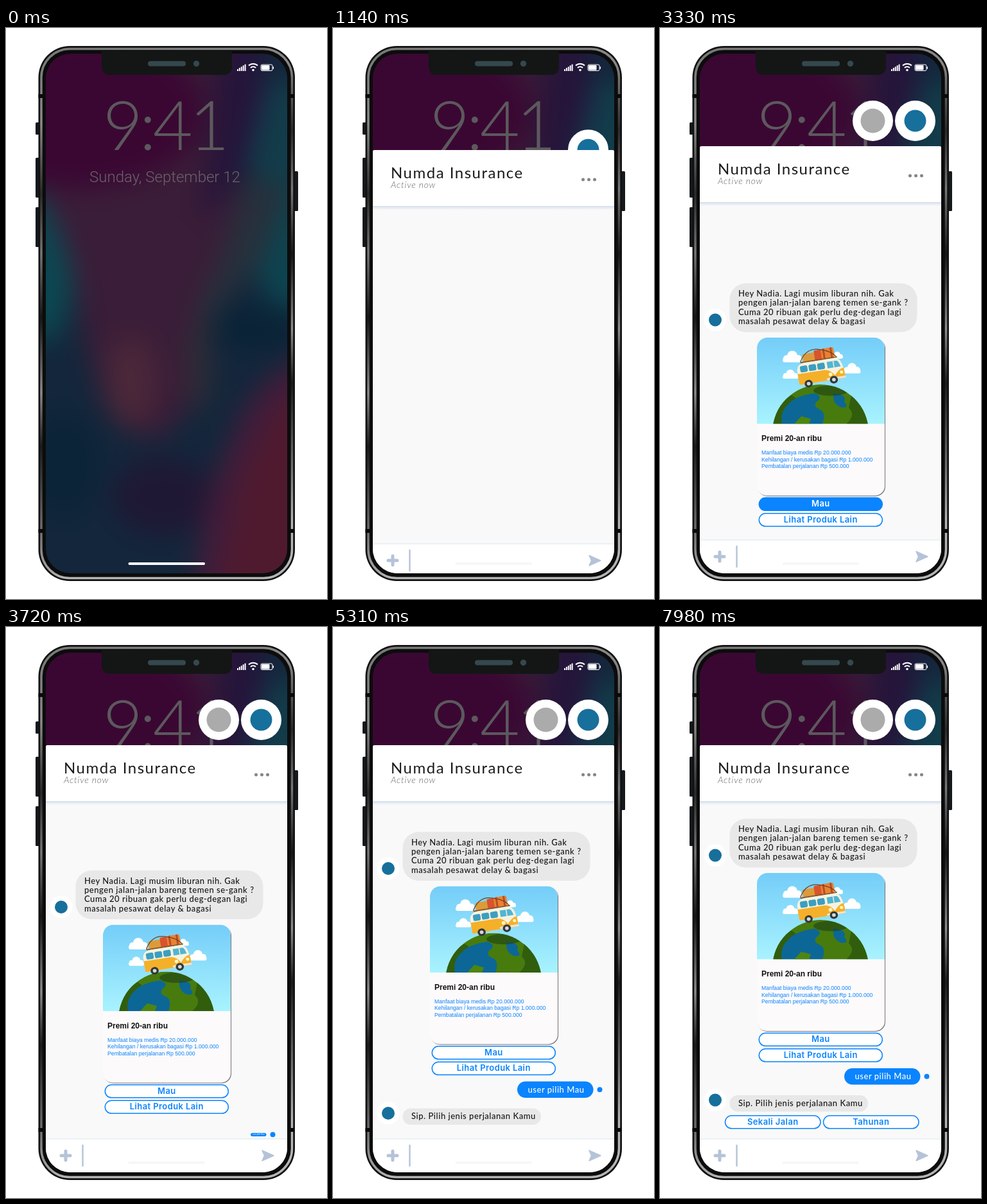
These frames come from a looping animation (500x889 px, 8000 ms). An HTML page:

```html
<!DOCTYPE html>
<html lang="id">
<head>
<meta charset="utf-8">
<title>Chat on a phone</title>
<style>
  html, body { margin: 0; width: 100%; height: 100%; overflow: hidden; background: #fff; }
  svg { display: block; width: 100vw; height: 100vh; }
  text { white-space: pre; }
  .chat { font: 500 13px Lato, sans-serif; letter-spacing: .53px; fill: #151515; }
  .label { font: 600 13px Inter, sans-serif; letter-spacing: .4px; text-anchor: middle; fill: #0a84ff; }
  .btn rect { fill: #fff; stroke: #0a84ff; stroke-width: 1.5; }
  .btn.on rect { fill: #0a84ff; }
  .btn.on text { fill: #fff; }
</style>
</head>
<body>
<svg id="stage" viewBox="0 0 500 889" xmlns="http://www.w3.org/2000/svg">
  <defs>
    <clipPath id="screen"><rect x="62" y="40" width="376" height="809" rx="38"/></clipPath>
    <clipPath id="picture"><path d="M151 219V101a16.500 16.500 0 0 1 16.500-16.500H333.500a16.500 16.500 0 0 1 16.500 16.500V219Z"/></clipPath>
    <clipPath id="ball"><circle cx="250" cy="232.500" r="75"/></clipPath>
    <filter id="soft" x="-30%" y="-30%" width="160%" height="160%" color-interpolation-filters="sRGB"><feGaussianBlur stdDeviation="20"/></filter>
    <linearGradient id="metal" x1="0" y1="0" x2=".12" y2="1">
      <stop offset="0" stop-color="#777"/><stop offset=".14" stop-color="#8a8a8a"/>
      <stop offset=".27" stop-color="#2a2a2a"/><stop offset=".38" stop-color="#777"/>
      <stop offset=".5" stop-color="#161616"/><stop offset=".64" stop-color="#8c8c8c"/>
      <stop offset=".74" stop-color="#1b1b1b"/><stop offset=".9" stop-color="#707070"/>
      <stop offset="1" stop-color="#b5b5b5"/>
    </linearGradient>
    <linearGradient id="sky" x1="0" y1="0" x2="0" y2="1">
      <stop offset="0" stop-color="#74cdf8"/><stop offset="1" stop-color="#a9f3ff"/>
    </linearGradient>
    <linearGradient id="fall" x1="0" y1="0" x2="0" y2="1">
      <stop offset="0" stop-color="#d3deec"/><stop offset="1" stop-color="#f9f9f9"/>
    </linearGradient>
  </defs>

  <g id="body"></g>

  <g clip-path="url(#screen)">
    <g id="wall" filter="url(#soft)"></g>
    <text x="247" y="190" text-anchor="middle" font-family="Lato, sans-serif" font-weight="300" font-size="107" letter-spacing="-5" fill="#5c595d">9:41</text>
    <text x="247.500" y="239.500" text-anchor="middle" font-family="Roboto, sans-serif" font-weight="300" font-size="24" fill="#6b636c">Sunday, September 12</text>
    <g id="status" fill="#fff"></g>

    <g id="second"><circle r="31.500" fill="#fff"/><circle r="19" fill="#ababab"/></g>
    <g id="first"><circle r="31.500" fill="#fff"/><circle r="17" fill="#176f9c"/></g>
    <rect x="190.500" y="832" width="119.500" height="4" rx="2" fill="#fff"/>

    <g id="panel">
      <path d="M62 700V3q0-3 3-3H435q3 0 3 3V700Z" fill="#f9f9f9"/>
      <path d="M62 87V3q0-3 3-3H435q3 0 3 3V87Z" fill="#fff"/>
      <rect x="62" y="87" width="376" height="6" fill="url(#fall)"/>
      <text x="90" y="44" font-family="Lato, sans-serif" font-size="24" letter-spacing="1.500" fill="#1b1b1b">Numda Insurance</text>
      <text x="90" y="59" font-family="Lato, sans-serif" font-size="14" font-weight="300" font-style="italic" letter-spacing=".7" fill="#666">Active now</text>
      <g fill="#858585"><circle cx="389.500" cy="46" r="2.500"/><circle cx="398.500" cy="46" r="2.500"/><circle cx="407.500" cy="46" r="2.500"/></g>
      <rect x="62" y="613" width="376" height="90" fill="#fff"/>
      <rect x="62" y="612" width="376" height="2" fill="#eaf2f7"/>
      <g stroke="#b5c3d8" stroke-linecap="round" fill="none">
        <path d="M86 639H100M93 632V646" stroke-width="5"/>
        <path d="M119.500 623V655" stroke-width="2.400"/>
      </g>
      <path d="M399 631L417 639L399 647L402.500 639Z" fill="#b5c3d8" stroke="#b5c3d8" stroke-width="1.500" stroke-linejoin="round"/>
    </g>
    <rect id="homeOver" x="190.500" y="832" width="119.500" height="4" rx="2" fill="#f7f7f7"/>

    <g id="list">
      <g id="face1"></g>
      <g id="hello">
        <rect x="108.500" width="292" height="76" rx="25" fill="#e8e8e8"/>
        <g id="helloText" class="chat"></g>
      </g>
      <g id="card"></g>
      <g id="reply">
        <rect x="287" y="388.500" width="118.500" height="25.500" rx="12.750" fill="#0a84ff"/>
        <text class="chat" x="347.500" y="405.500" text-anchor="middle" style="fill:#fff">user pilih Mau</text>
      </g>
      <circle id="dot" cx="415.500" r="4" fill="#0a84ff"/>
      <g id="face2"></g>
      <g id="ask">
        <rect x="108.500" y="430.500" width="215.500" height="25.500" rx="12.500" fill="#e8e8e8"/>
        <text class="chat" x="122" y="447">Sip. Pilih jenis perjalanan Kamu</text>
      </g>
      <g id="options"></g>
    </g>
  </g>

  <path d="M149 36H352V61a12 12 0 0 1-12 12H161a12 12 0 0 1-12-12Z" fill="#131615"/>
  <rect x="221" y="51.500" width="59" height="8" rx="4" fill="#35484e"/>
  <circle cx="296.500" cy="55.500" r="4.700" fill="#35484e"/>
</svg>

<script>
const LOOP = 8000, STEP = 30;
const $ = id => document.getElementById(id);
const fill = (id, html) => { $(id).innerHTML = html; };
const box = (x, y, w, h, r, c) => `<rect x="${x}" y="${y}" width="${w}" height="${h}" rx="${r}" fill="${c}"/>`;
const disc = (x, y, r, c) => `<circle cx="${x}" cy="${y}" r="${r}" fill="${c}"/>`;
const oval = (x, y, rx, ry, c) => `<ellipse cx="${x}" cy="${y}" rx="${rx}" ry="${ry}" fill="${c}"/>`;
const shape = (d, c) => `<path d="${d}" fill="${c}"/>`;
const button = (id, x, y, w, label) =>
  `<g id="${id}" class="btn"><rect x="${x}" y="${y}" width="${w}" height="20" rx="10"/>` +
  `<text class="label" x="${x + w / 2}" y="${y + 13.7}">${label}</text></g>`;
const cloud = (x, y, s) => `<g transform="translate(${x} ${y}) scale(${s})">` +
  disc(-9, 1, 5, '#fff') + disc(0, -3, 8, '#fff') + disc(9, 1, 5.5, '#fff') + box(-15, 0, 30, 7, 3.5, '#fff') + '</g>';

// Phone body
fill('body',
  [[46, 147, 19], [46, 202, 62], [46, 279, 62], [449, 223, 62]].map(([x, y, h]) => box(x, y, 6, h, 1.5, '#14191d')).join('') +
  box(50.5, 28, 399.5, 833, 49, '#111') +
  '<rect x="55" y="32.500" width="390.500" height="824" rx="44.500" fill="#0d0d0d" stroke="url(#metal)" stroke-width="3.500"/>' +
  box(57.5, 35, 385.5, 819, 42, '#0c0c0c') +
  [103, 780].map(y => box(50.5, y, 8, 6, 0, '#0a0a0a') + box(441.5, y, 8, 6, 0, '#0a0a0a')).join(''));

// Wallpaper
fill('wall',
  box(0, 0, 500, 889, 0, '#13263b') +
  oval(435, 190, 55, 110, '#123c4a') +
  oval(440, 350, 50, 90, '#0d4450') +
  oval(58, 370, 48, 120, '#0c4751') +
  shape('M385 230L440 250L400 360L330 440L300 560L260 590L250 440Z', '#27303b') +
  shape('M0 0H375Q400 240 300 430L285 560Q280 625 235 638Q185 642 155 590Q125 520 112 420Q95 320 50 255L0 230Z', '#3a1d38') +
  oval(110, 130, 200, 120, '#3a0733') +
  shape('M330 0H400V110Q370 260 300 300Q330 160 330 0Z', '#25143a') +
  oval(195, 550, 40, 70, '#4b2739') +
  oval(300, 525, 20, 75, '#2e2c36') +
  oval(390, 465, 70, 36, '#0a2337') +
  oval(90, 680, 55, 80, '#0b2438') +
  oval(245, 730, 80, 60, '#1f1834') +
  shape('M500 505Q390 525 350 640Q305 730 290 889H500Z', '#421c3a') +
  shape('M500 550L425 590L370 700L330 889H500Z', '#501a2e'));

// Status icons
fill('status',
  [0, 1, 2, 3, 4].map(i => box(360 + i * 2.9, 64 - i * 1.9, 2, 3 + i * 1.9, .5, '#fff')).join('') +
  disc(385, 65.5, 1.8, '#fff') +
  '<path d="M381 62a5.500 5.500 0 0 1 8 0M378 58.500a10 10 0 0 1 14 0" fill="none" stroke="#fff" stroke-width="2"/>' +
  '<rect x="397" y="57" width="18" height="9.500" rx="2" fill="none" stroke="#fff"/>' +
  box(398, 58, 12.5, 7.5, 1, '#fff') + box(415.5, 60, 1.5, 4, .7, '#fff'));

// Messages
fill('helloText', [
  'Hey Nadia. Lagi musim liburan nih. Gak',
  'pengen jalan-jalan bareng temen se-gank ?',
  'Cuma 20 ribuan gak perlu deg-degan lagi',
  'masalah pesawat delay &amp; bagasi'
].map((s, i) => `<text x="122" y="${20.5 + i * 14.35}">${s}</text>`).join(''));
for (const id of ['face1', 'face2']) fill(id, disc(0, 0, 17.5, '#fff') + disc(0, 0, 10, '#176f9c'));

// Travel card
const van = '<g transform="translate(250 136) rotate(-9) scale(.97 .9)">' +
  box(-25, -33, 22, 14, 3, '#dc9a3b') + box(-6, -36, 13, 17, 2, '#d9532c') + box(5, -37, 21, 18, 3, '#e98231') +
  box(8, -37, 3, 18, 0, '#b84b28') + box(20, -37, 3, 18, 0, '#b84b28') +
  '<path d="M-30-20Q-18-43 2-37T28-20" fill="none" stroke="#70401f" stroke-width="1.300"/>' +
  box(-30, -20, 60, 2, 1, '#8a5525') +
  shape('M-37 17V-7Q-35-18-23-18H25Q33-18 36-5L38 8V17Q38 19 35 19H-35Q-37 19-37 17Z', '#f7f2df') +
  shape('M-37 0H7Q16 1 22 12Q29 2 37 1L38 8V17Q38 19 35 19H-35Q-37 19-37 17Z', '#f5b02a') +
  [-32, -18, -4].map(x => box(x, -13, 12, 11, 2.5, '#3c9fc0')).join('') +
  shape('M12-13H28Q31-12 33-2H12Z', '#51b5d2') + box(21.5, -13, 1.5, 11, 0, '#f7f2df') +
  disc(15, 9, 3, '#fff5bf') + disc(33, 8, 2.7, '#fff5bf') +
  box(8, 15, 31, 3.5, 1.7, '#e8e6df') +
  [-22, 19].map(x => disc(x, 19, 6.5, '#30383b') + disc(x, 19, 3, '#d6d9d8')).join('') + '</g>';
const globe = '<g clip-path="url(#ball)">' + disc(250, 232.5, 75, '#477b0e') +
  shape('M176 219Q182 186 205 174L212 179Q194 192 190 219Z', '#315e0d') +
  shape('M190 219Q186 200 201 187Q212 175 240 171Q256 176 243 185Q238 193 250 197Q259 202 253 219Z', '#0c6796') +
  shape('M270 171Q292 173 287 184Q296 195 282 193Q268 188 270 171Z', '#0c6796') +
  shape('M298 174Q320 190 325 219H290Q306 205 294 194Z', '#315e0d') +
  shape('M209 219L220 207L235 211L232 219Z', '#4e8510') +
  oval(266, 167, 27, 8, 'rgba(30,65,20,.6)') + '</g>';
const facts = ['Manfaat biaya medis Rp 20.000.000', 'Kehilangan / kerusakan bagasi Rp 1.000.000', 'Pembatalan perjalanan Rp 500.000'];
fill('card',
  box(152, 86, 199, 245.5, 15, '#77747a') + box(151, 84.5, 199, 246, 15, '#fcfafb') +
  '<g clip-path="url(#picture)">' + box(151, 84.5, 199, 135, 0, 'url(#sky)') +
  cloud(206, 116, 1) + cloud(203, 143, .8) + cloud(299, 134, .9) + cloud(276, 113, .6) + globe + van + '</g>' +
  '<g font-family="Liberation Sans, Arial, sans-serif">' +
  '<text x="158" y="245.500" font-size="12" font-weight="700" fill="#111">Premi 20-an ribu</text>' +
  facts.map((s, i) => `<text x="158" y="${266.8 + i * 10.4}" font-size="8.700" fill="#0a84ff">${s}</text>`).join('') + '</g>' +
  button('yes', 154.3, 333.8, 192, 'Mau') + button('other', 154.3, 358.3, 192, 'Lihat Produk Lain'));
fill('options', button('single', 101.5, 462.3, 148.5, 'Sekali Jalan') + button('annual', 254.5, 462.3, 148.5, 'Tahunan'));

// Motion
const clamp = p => Math.min(1, Math.max(0, p));
const span = (t, start, length) => clamp((t - start) / length);
const back = p => { const q = p - 1; return p <= 0 ? 0 : 1 + 2.5 * q ** 3 + 1.5 * q * q; };
const mix = (a, b, p) => a + (b - a) * p;
const SCROLL = [[2640, 717], [2700, 691], [3240, 402], [3330, 397.5], [3700, 379], [4180, 379],
  [4560, 336], [5160, 336], [5310, 319], [5490, 306.5], [7890, 306.5], [7980, 298.5]];

function track(keys, t) {
  const i = keys.findIndex(k => k[0] > t);
  if (i < 0) return keys[keys.length - 1][1];
  if (!i) return keys[0][1];
  const [a, b] = [keys[i - 1], keys[i]];
  return mix(a[1], b[1], (t - a[0]) / (b[0] - a[0]));
}
const move = (id, x, y, s = 1) => $(id).setAttribute('transform', `translate(${x} ${y}) scale(${s})`);
const grow = (id, x, y, s) => move(id, x * (1 - s), y * (1 - s), s);
const show = (id, on) => $(id).setAttribute('opacity', +on);

function draw(t) {
  const top = 184 + 665 * (1 - span(t, 0, 1650)) ** 4;
  move('panel', 0, top);
  show('homeOver', top < 832);

  move('first', 397.5, mix(244.5, 144.5, back(span(t, 1059, 540))));
  show('first', t > 1059);
  move('second', mix(397.5, 331.5, back(span(t, 1650, 500))), 144.5);
  show('second', t > 1650);

  move('list', 0, track(SCROLL, t));
  const hello = back(span(t, 2230, 450));
  const reply = back(span(t, 3698, 450));
  const ask = back(span(t, 4600, 450));
  grow('hello', 108.5, 76, hello);
  move('face1', 86, 57, Math.min(1, hello));
  move('card', 0, 75 * (1 - span(t, 2700, 300)));
  show('card', t > 2700);
  grow('reply', 405.5, 414, reply);
  $('dot').setAttribute('cy', 414 - 12.75 * reply);
  show('dot', reply > 0);
  grow('ask', 108.5, 456, ask);
  move('face2', 86, 438, Math.min(1, ask));

  const single = span(t, 5370, 120), annual = span(t, 5670, 120);
  show('single', single);
  show('annual', annual);
  move('annual', 0, 2 * (1 - annual));
  $('yes').classList.toggle('on', t >= 3240 && t < 3600);
  $('single').classList.toggle('on', t >= 6750 && t < 7650);
}

const begin = performance.now();
function tick() {
  const t = (performance.now() - begin) % LOOP;
  draw(Math.floor(t / STEP) * STEP);
  requestAnimationFrame(tick);
}
tick();
</script>
</body>
</html>
```
